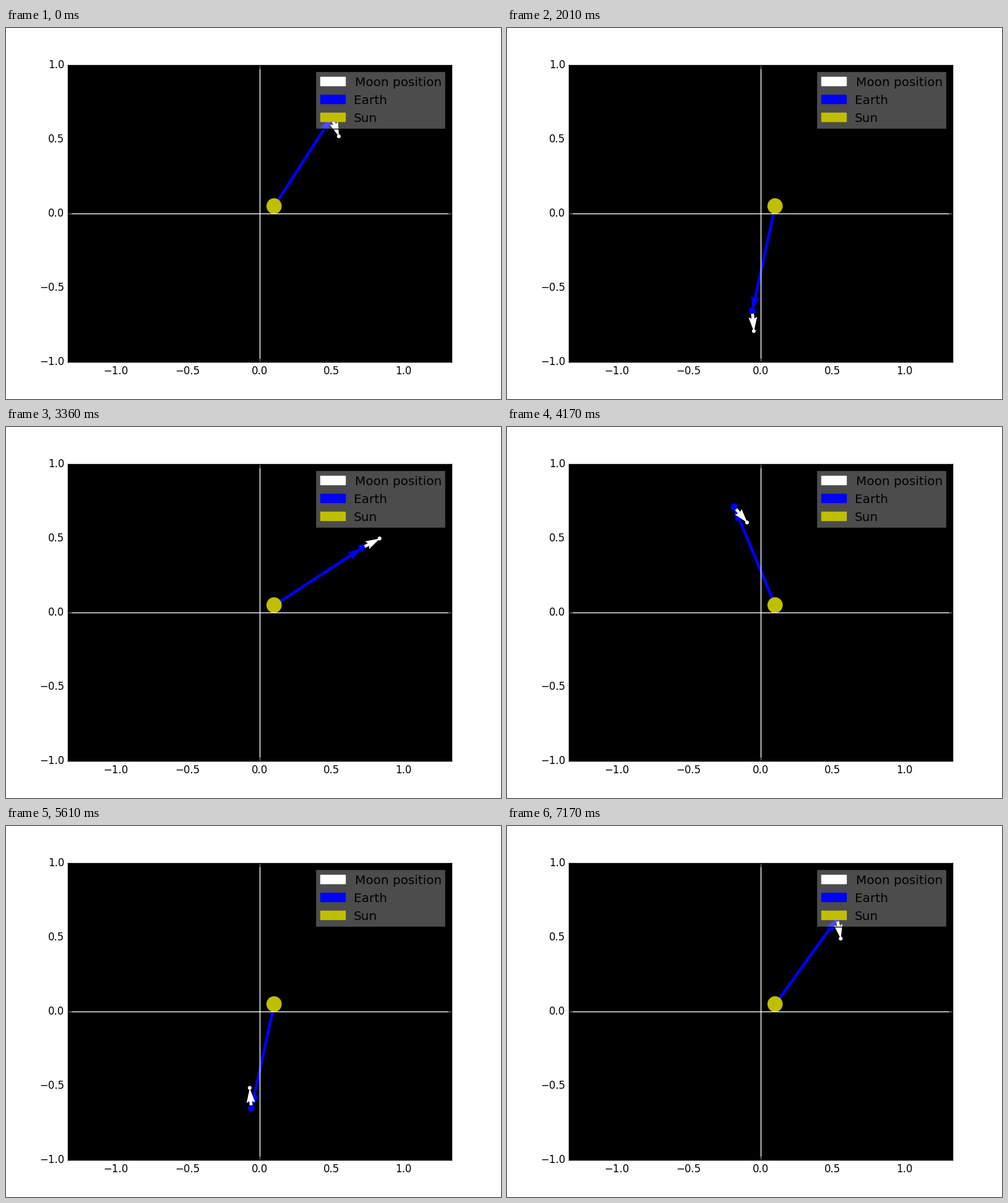
Animation of 800 by 600 pixels, one loop 7200 ms. Source, as a matplotlib script:

```python
import numpy as np
import matplotlib.pyplot as plt
from matplotlib.animation import FuncAnimation
from matplotlib.patches import Circle, Rectangle
from matplotlib.transforms import Affine2D

W, H = 800, 600
FRAMES = 240
SUN = np.array([0.1, 0.05])
EARTH_ARM = np.array([0.4, 0.6])
MOON_ARM = np.array([0.05, -0.13])
EARTH_STEP = 3.0   # degrees per frame
MOON_STEP = 10.5

plt.style.use("classic")
plt.rcParams.update({
    "font.family": "DejaVu Sans",
    "figure.dpi": 100,
    "savefig.dpi": 100,
    "figure.facecolor": "white",
    "savefig.facecolor": "white",
    "axes.facecolor": "black",
    "axes.unicode_minus": True,
    "ytick.alignment": "center",
})

fig = plt.figure(figsize=(W / 100, H / 100), dpi=100)
ax = fig.add_axes([0.125, 0.1, 0.775, 0.8])


def rotate(v, degrees):
    a = np.radians(degrees)
    c, s = np.cos(a), np.sin(a)
    return np.array([c * v[0] - s * v[1], s * v[0] + c * v[1]])


def arrow(start, arm, color):
    return ax.quiver([start[0]], [start[1]], [arm[0]], [arm[1]], color=color,
                     angles="xy", scale_units="xy", scale=1)


def body(center, radius, color):
    return ax.add_patch(Circle(center, radius, color=color))


earth_arrow = arrow(SUN, EARTH_ARM, "b")
moon_arrow = arrow(SUN + EARTH_ARM, MOON_ARM, "w")
sun = body(SUN, 0.05, "y")
earth = body(SUN + EARTH_ARM, 0.02, "b")
moon = body(SUN + EARTH_ARM + MOON_ARM, 0.01, "w")

ax.axhline(0, color="w")
ax.axvline(0, color="w")
ax.set_xlim(-4 / 3, 4 / 3)
ax.set_ylim(-1, 1)
ax.set_xticks([-1, -0.5, 0, 0.5, 1])
ax.set_yticks([-1, -0.5, 0, 0.5, 1])

# Legend, laid out in pixels from the top left corner
px = Affine2D().scale(1, -1).translate(0, H)


def box(x, y, w, h, face, edge):
    fig.add_artist(Rectangle((x, y), w, h, facecolor=face, edgecolor=edge,
                             transform=px))


box(500, 70, 210, 93, (1, 1, 1, 0.3), "k")
entries = [("Moon position", "w", 564), ("Earth", "b", 562), ("Sun", "y", 562)]
for i, (label, color, x) in enumerate(entries):
    top = 79 + 29 * i
    box(508, top, 40, 14, color, color)
    fig.text(x, top + 15, label, fontsize=14.4, color="k", transform=px)


def update(i):
    earth_arm = rotate(EARTH_ARM, EARTH_STEP * i)
    moon_arm = rotate(MOON_ARM, MOON_STEP * i)
    center = SUN + earth_arm
    earth_arrow.set_UVC([earth_arm[0]], [earth_arm[1]])
    moon_arrow.set_offsets([center])
    moon_arrow.set_UVC([moon_arm[0]], [moon_arm[1]])
    earth.center = tuple(center)
    moon.center = tuple(center + moon_arm)
    return earth_arrow, moon_arrow, earth, moon


anim = FuncAnimation(fig, update, frames=FRAMES, interval=30,
                     init_func=lambda: update(0), repeat=True, blit=False)
plt.show()
```
